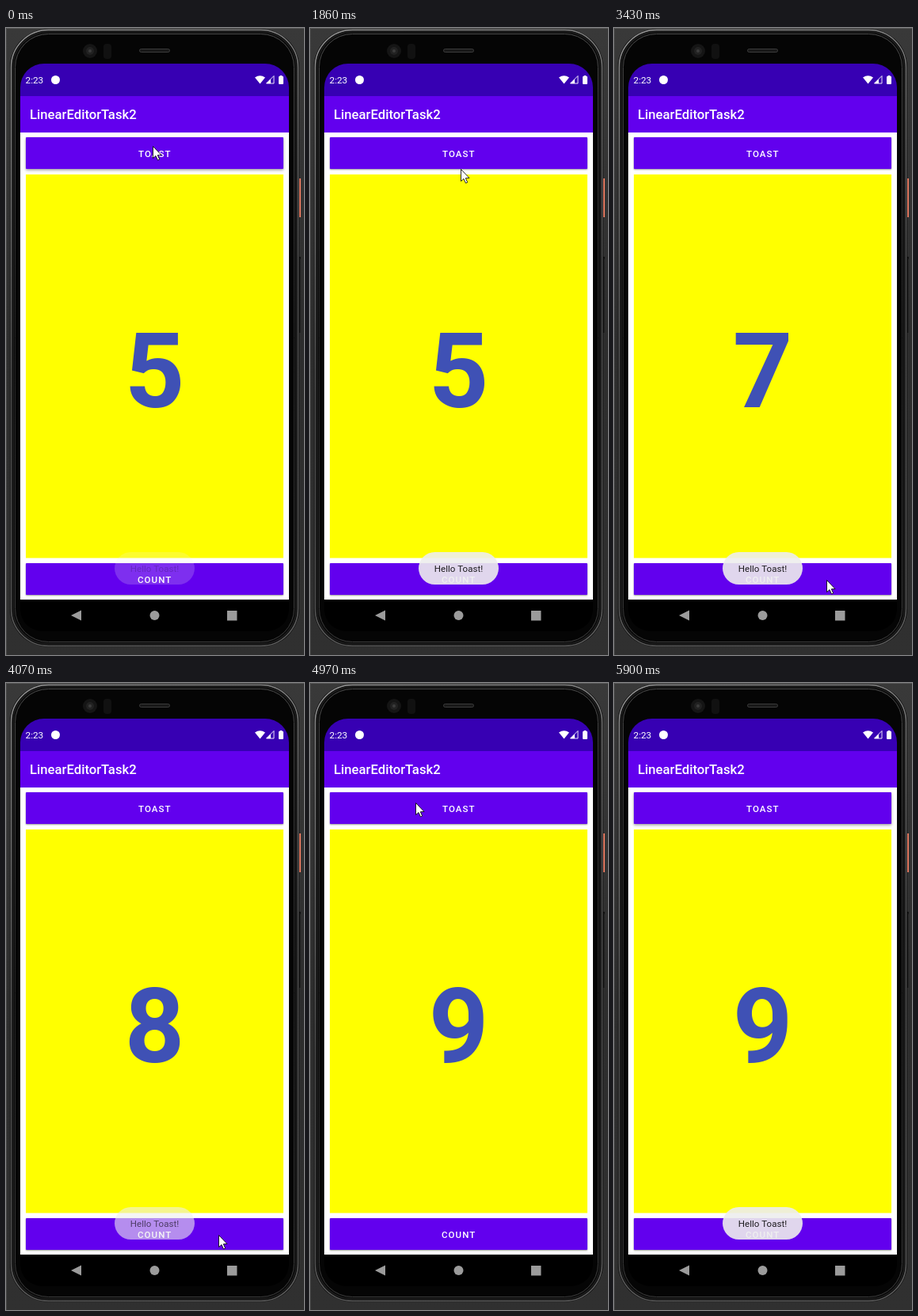
Recreate the animation shown at these times as an HTML page with a canvas. Size 376x792 px, loop 6.45 s.

```html
<!DOCTYPE html>
<html lang="en">
<head>
<meta charset="utf-8">
<title>Toast and counter</title>
<style>
html, body { margin: 0; width: 100%; height: 100%; overflow: hidden; background: #303030; }
canvas { display: block; width: 376px; height: 792px; }
</style>
</head>
<body>
<canvas id="stage"></canvas>
<script>
const W = 376, H = 792, LOOP = 6450;
const FONT = 'Roboto, sans-serif';
const canvas = document.getElementById('stage');
const ctx = canvas.getContext('2d');
const ratio = window.devicePixelRatio || 1;
canvas.width = W * ratio;
canvas.height = H * ratio;

// Each track lists [start time, value...]; values hold until the next entry.
const counter = [[0, '5'], [2820, '6'], [3310, '7'], [3830, '8'], [4450, '9']];
const toastAlpha = [
  [0, 0.22], [150, 0.6], [290, 0.88], [410, 1],
  [3950, 0.93], [4070, 0.66], [4190, 0.28], [4310, 0],
  [5400, 0.22], [5520, 0.6], [5660, 0.88], [5780, 1]
];
const pointer = [
  [0, 185, 149], [1860, 190, 178], [1980, 214, 340], [2100, 236, 527],
  [2260, 239, 541], [2410, 275, 679], [2570, 275, 698], [2940, 268, 697],
  [4570, 190, 395], [4700, 98, 79], [4840, 122, 126], [4970, 133, 151],
  [5660, 190, 400], [5780, 269, 709], [5900]
];
const toastLift = [[0, 1], [1090, 0], [5400, 1]];
const countLift = [[0, 0], [2820, 1], [3060, 0], [3310, 1], [3430, 0],
  [3830, 1], [4070, 0], [4450, 1], [4700, 0]];

function at(track, t) {
  let i = track.length - 1;
  while (i > 0 && track[i][0] > t) i--;
  return track[i].slice(1);
}

function rect(x, y, w, h, color) {
  ctx.fillStyle = color;
  ctx.fillRect(x, y, w, h);
}

function roundPath(x, y, w, h, r) {
  ctx.beginPath();
  ctx.roundRect(x, y, w, h, r);
}

function disc(x, y, r, color) {
  ctx.fillStyle = color;
  ctx.beginPath();
  ctx.arc(x, y, r, 0, Math.PI * 2);
  ctx.fill();
}

function poly(points, fill, stroke, width = 1) {
  ctx.beginPath();
  points.forEach(([x, y]) => ctx.lineTo(x, y));
  ctx.closePath();
  if (fill) { ctx.fillStyle = fill; ctx.fill(); }
  if (stroke) { ctx.strokeStyle = stroke; ctx.lineWidth = width; ctx.stroke(); }
}

function label(text, x, y, size, weight, color, spacing = 0, align = 'left') {
  ctx.font = `${weight} ${size}px ${FONT}`;
  ctx.letterSpacing = spacing + 'px';
  ctx.textAlign = align;
  ctx.fillStyle = color;
  ctx.fillText(text, x, y);
}

function fade(x0, y0, x1, y1, colors) {
  const g = ctx.createLinearGradient(x0, y0, x1, y1);
  colors.forEach((c, i) => g.addColorStop(i / (colors.length - 1), c));
  return g;
}

function outline(x, y, w, h, r, color, width) {
  roundPath(x, y, w, h, r);
  ctx.strokeStyle = color;
  ctx.lineWidth = width;
  ctx.stroke();
}

function drawPhone() {
  rect(0, 0, W, H, fade(0, 0, 0, H, ['#393939', '#2d2d2d', '#303030']));
  rect(0, 0, W, 1, '#555');
  rect(0, 0, 1, H, '#4a4a4a');
  rect(369, 190, 3, 49, '#df775f');
  rect(370, 289, 2, 3, '#111');
  rect(370, 290, 1.5, 95, '#191919');

  roundPath(5, 1.5, 365, 780, 48);
  ctx.fillStyle = '#070707';
  ctx.fill();
  outline(6.5, 2.5, 362, 778, 47, fade(0, 0, W, H, ['#999', '#555', '#606060']), 1.5);
  outline(9, 5, 357, 773, 44, '#1b1b1b', 2);
  outline(11.5, 7.5, 352, 768, 42, fade(0, 0, 0, H, ['#4b4b4b', '#242424', '#3d3d3d']), 1);
  roundPath(13, 9, 349, 765, 40);
  ctx.fillStyle = '#050505';
  ctx.fill();

  disc(106, 29, 9, '#151515');
  disc(106, 29, 5, '#222');
  disc(106, 29, 2, '#3b3b3b');
  roundPath(123, 20, 10, 19, 4);
  ctx.fillStyle = '#111';
  ctx.fill();
  roundPath(168.5, 26.5, 38, 4, 2);
  ctx.fillStyle = '#181818';
  ctx.fill();
  ctx.strokeStyle = '#3a3a3a';
  ctx.lineWidth = 1;
  ctx.stroke();
}

function drawStatusIcons() {
  disc(62.5, 65.5, 5.5, '#fff');
  ctx.fillStyle = '#fff';
  ctx.beginPath();
  ctx.moveTo(320.5, 70.5);
  ctx.lineTo(314, 62.5);
  ctx.quadraticCurveTo(320.5, 58, 327, 62.5);
  ctx.fill();
  poly([[338, 60.5], [338, 70], [328.5, 70]], null, '#fff', 0.9);
  poly([[334, 64.5], [334, 70], [328.5, 70]], '#fff');
  rect(345.5, 60, 3, 2, '#fff');
  roundPath(344, 61, 6, 10, 1);
  ctx.fillStyle = '#fff';
  ctx.fill();
}

function drawButton(y, text, x, lift) {
  ctx.save();
  ctx.shadowColor = 'rgba(0,0,0,0.4)';
  ctx.shadowBlur = (2 + lift * 1.5) * ratio;
  ctx.shadowOffsetY = (1 + lift * 0.5) * ratio;
  roundPath(25, y, 325, 40, 1);
  ctx.fillStyle = '#6200ee';
  ctx.fill();
  ctx.restore();
  label(text, x, y + 24.7, 11.55, 500, '#fff', 1.03);
}

function drawScreen(t) {
  ctx.save();
  roundPath(18, 45, 339, 717, [30, 30, 28, 28]);
  ctx.clip();
  rect(18, 45, 339, 41, '#3700b3');
  rect(18, 86, 339, 46, '#6200ee');
  rect(18, 132, 339, 590, '#fff');
  rect(18, 722, 339, 40, '#000');
  ctx.restore();

  label('2:23', 24.5, 70, 11.8, 400, '#fff');
  drawStatusIcons();
  label('LinearEditorTask2', 30, 115, 16.7, 500, '#fff');

  drawButton(138, 'TOAST', 167, at(toastLift, t)[0]);
  rect(25, 185, 325, 484.5, '#ff0');
  label(at(counter, t)[0], 187.5, 479, 132, 700, '#3f51b5', 0, 'center');
  drawButton(676, 'COUNT', 166, at(countLift, t)[0]);

  poly([[82, 742], [95, 735.5], [95, 748.5]], '#9b9b9b');
  disc(187.5, 742, 6, '#9b9b9b');
  rect(279, 736, 12.5, 12.5, '#9b9b9b');
}

function drawToast(alpha) {
  ctx.save();
  ctx.globalAlpha = alpha * 0.9;
  roundPath(137, 662, 101, 41, 20.5);
  ctx.fillStyle = '#eee';
  ctx.fill();
  ctx.globalAlpha = alpha;
  label('Hello Toast!', 187.5, 687, 11.55, 400, 'rgba(0,0,0,0.87)', 0, 'center');
  ctx.restore();
}

function drawPointer(x, y) {
  ctx.save();
  ctx.translate(x + 0.5, y + 0.5);
  ctx.lineJoin = 'round';
  poly([[0, 0], [0, 15], [3.5, 12], [6, 17.5], [8.2, 16.5], [5.8, 11.2], [10.5, 11]],
    '#fff', '#111', 0.9);
  ctx.restore();
}

function draw(t) {
  ctx.setTransform(ratio, 0, 0, ratio, 0, 0);
  drawPhone();
  drawScreen(t);
  drawToast(at(toastAlpha, t)[0]);
  const tip = at(pointer, t);
  if (tip.length) drawPointer(...tip);
}

function tick() {
  draw(performance.now() % LOOP);
  requestAnimationFrame(tick);
}
tick();
</script>
</body>
</html>
```
